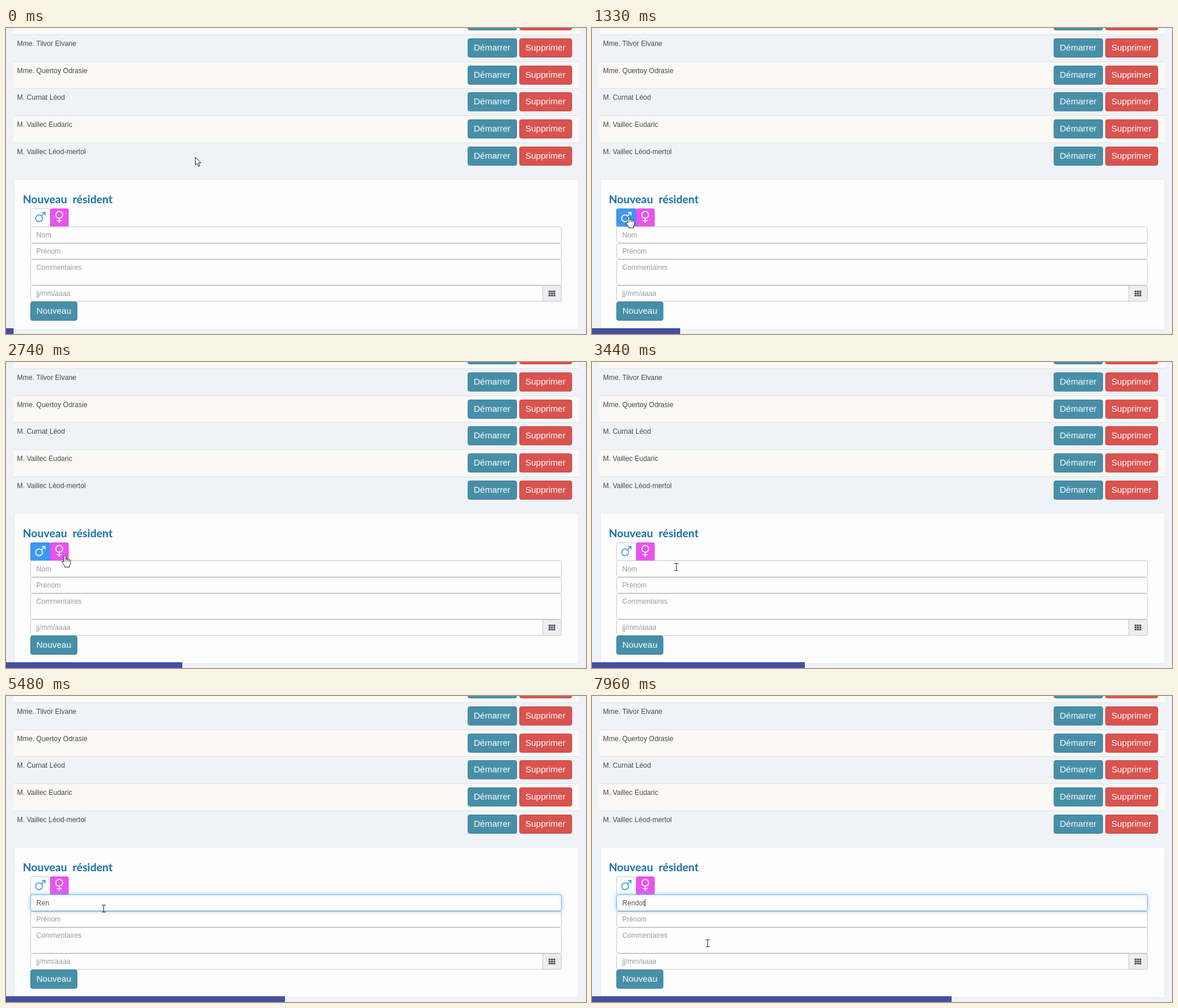
Animation, 1000 px wide and 529 px high, one loop 8000 ms. Source, as an HTML page with a canvas:

```html
<!DOCTYPE html>
<html lang="fr">
<head>
<meta charset="utf-8">
<title>Nouveau résident</title>
<style>
html, body { margin: 0; width: 100%; height: 100%; overflow: hidden; background: #eff3f7; }
canvas { display: block; width: 1000px; height: 529px; }
</style>
</head>
<body>
<canvas id="stage" width="1000" height="529"></canvas>
<script>
const ctx = document.getElementById('stage').getContext('2d');
const LOOP = 8000;
const SANS = '"Liberation Sans", Arial, sans-serif';
const TEAL = '#478fa8', RED = '#d9534f', BLUE = '#3c99f2', PINK = '#ea53f1';
const RESIDENTS = ['Mme. Tilvor Elvane', 'Mme. Quertoy Odrasie', 'M. Curnat Léod',
  'M. Vaillec Eudaric', 'M. Vaillec Léod-mertol'];
const SURNAME = 'Rendot';
const ROW = 46.65;

// Screen updates: first time, last time, steps, pointer position at the end
const UPDATES = [
  [550, 870, 5, 44, 274], [950, 1330, 6, 63, 325], [1730, 1800, 2],
  [2030, 2030, 1], [2120, 2740, 9, 101, 334], [3120, 3120, 1],
  [3200, 3510, 5, 150, 356], [3680, 3830, 3, 168, 367], [4300, 4300, 1],
  [4530, 4530, 1], [4700, 4700, 1], [5020, 5020, 1], [5480, 5480, 1],
  [6000, 6000, 1], [6400, 6400, 1], [6630, 6630, 1], [6860, 6860, 1],
  [7010, 7010, 1], [7480, 7480, 1], [7640, 7960, 5, 199, 427]
];
const KEY_TIMES = [4530, 4700, 5020, 6630, 6860, 7010];
const CARET_OFF = [[5480, 6000], [6400, 6630], [7480, 7960]];

function progressAt(t) {
  let x = 326, y = 223, steps = 1;
  for (const [from, to, count, endX = x, endY = y] of UPDATES) {
    if (t < from) break;
    const gap = count > 1 ? (to - from) / (count - 1) : 1;
    const done = Math.min(count, Math.floor((t - from) / gap + 1e-6) + 1);
    const u = done / count, eased = u * u * (3 - 2 * u);
    x += (endX - x) * eased;
    y += (endY - y) * eased;
    steps += done;
  }
  return { x, y, steps };
}

function text(str, x, y, color, font = '12px ' + SANS) {
  ctx.font = font;
  ctx.fillStyle = color;
  ctx.fillText(str, x, y);
}

function box(x, y, w, h, fill, border, radius = 3) {
  ctx.beginPath();
  ctx.roundRect(x + .5, y + .5, w - 1, h - 1, radius);
  ctx.fillStyle = fill;
  ctx.fill();
  ctx.strokeStyle = border;
  ctx.lineWidth = 1;
  ctx.stroke();
}

function button(label, x, y, w, fill, border) {
  box(x, y, w, 33, fill, border);
  text(label, x + 10.5, y + 21, '#fff', '15px ' + SANS);
}

function line(points, color, width) {
  ctx.beginPath();
  points.forEach(([x, y], i) => i ? ctx.lineTo(x, y) : ctx.moveTo(x, y));
  ctx.strokeStyle = color;
  ctx.lineWidth = width;
  ctx.stroke();
}

function ring(x, y, r, color) {
  ctx.beginPath();
  ctx.arc(x, y, r, 0, Math.PI * 2);
  ctx.strokeStyle = color;
  ctx.lineWidth = 1.7;
  ctx.stroke();
}

function drawList() {
  for (let i = -1; i < 5; i++) {
    const top = Math.round(11 + i * ROW);
    ctx.fillStyle = i % 2 ? '#faf9f6' : '#eff3f7';
    ctx.fillRect(13, top, 975, 47);
    ctx.fillStyle = '#dde1e4';
    ctx.fillRect(13, top, 975, 1);
    const y = Math.round(18.1 + i * ROW);
    button('Démarrer', 796, y, 85, TEAL, '#3b7f98');
    button('Supprimer', 885, y, 91, RED, '#d04540');
    if (i >= 0) text(RESIDENTS[i], 19, y + 13, '#484848');
  }
}

function drawToggles(maleOn, femaleOn) {
  box(42, 312, 35, 32, maleOn ? BLUE : '#fefefe', maleOn ? '#3488d9' : '#ccc', 2);
  box(76, 312, 32, 32, femaleOn ? PINK : '#fefefe', femaleOn ? '#d94be0' : '#ccc', 2);
  const male = maleOn ? '#fff' : '#3f9bdc', female = femaleOn ? '#fff' : '#ec74ee';
  ring(57, 329, 5.9, male);
  line([[61.2, 324.8], [67, 319]], male, 1.7);
  line([[62, 318.8], [67.3, 318.8], [67.3, 324]], male, 1.7);
  ring(91.8, 323, 5.9, female);
  line([[91.8, 329], [91.8, 337]], female, 1.7);
  line([[87.5, 333], [96.2, 333]], female, 1.7);
}

function drawForm(t, pointer) {
  box(14, 261, 974, 261, '#fdfdfd', '#e4e9ed');
  const title = '700 19px Lato, sans-serif';
  text('Nouveau', 29, 303, '#1a70a6', title);
  text('résident', 115, 303, '#1a70a6', title);

  const overToggles = pointer.y > 312 && pointer.y < 344;
  const overMale = overToggles && pointer.x > 42 && pointer.x < 76;
  const overFemale = overToggles && pointer.x >= 76 && pointer.x < 108;
  const maleChosen = t >= 1730 && t < 3120;
  drawToggles(maleChosen || overMale, !maleChosen || overFemale);

  const focused = t >= 4300;
  const typed = SURNAME.slice(0, KEY_TIMES.filter(k => t >= k).length);
  box(42, 372, 916, 28, '#fefefe', '#c8c8c8');
  box(42, 400, 916, 45, '#fefefe', '#c8c8c8');
  box(42, 445, 916, 28, '#fefefe', '#c8c8c8');
  if (focused) {
    ctx.shadowColor = 'rgba(102,175,233,.6)';
    ctx.shadowBlur = 7;
  }
  box(42, 343, 916, 29, '#fefefe', focused ? '#72b3e4' : '#c8c8c8');
  ctx.shadowBlur = 0;

  text(typed || 'Nom', 52.3, 361.5, typed ? '#555' : '#999');
  if (focused && !CARET_OFF.some(([a, b]) => t >= a && t < b)) {
    const end = typed ? ctx.measureText(typed).width : 0;
    ctx.fillStyle = '#444';
    ctx.fillRect(Math.round(52 + end), 351, 1, 13);
  }
  text('Prénom', 52.3, 390, '#999');
  text('Commentaires', 52.3, 418, '#999');
  text('jj/mm/aaaa', 52.3, 463, '#999');

  box(925, 445, 33, 28, '#eee', '#c8c8c8', [0, 3, 3, 0]);
  ctx.fillStyle = '#414a60';
  for (let i = 0; i < 9; i++)
    ctx.fillRect(935.5 + i % 3 * 4.1, 454 + Math.floor(i / 3) * 3.6, 3.3, 2.7);
  button('Nouveau', 42, 473, 81, TEAL, '#3b7f98');
}

const ARROW = new Path2D('M0 0V13.4L3.1 10.5L5.3 15.6L7.5 14.6L5.3 9.7H9.6Z');
const HAND = new Path2D('M-1.6 1.2Q0 -1.2 1.6 1.2V6.2Q3.3 5 4.6 6.7Q6.3 5.7 7.3 7.4' +
  'Q9.8 6.8 9.8 9.3V13.5Q9.6 16 8 17.5V20H-.3V18Q-2.4 15.5 -4.5 12' +
  'Q-5.4 9.6 -3.4 9.6L-1.6 11.4Z');

function drawPointer({ x, y }) {
  const onField = x > 42 && x < 958 && y > 344 && y < 473;
  const onToggle = x > 42 && x < 108 && y > 312 && y <= 344;
  ctx.save();
  ctx.translate(Math.round(x), Math.round(y));
  if (onField) {
    ctx.fillStyle = '#333';
    ctx.fillRect(0, -6, 1, 13);
    for (const end of [-6, 6]) {
      ctx.fillRect(-3, end, 3, 1);
      ctx.fillRect(1, end, 3, 1);
    }
  } else {
    const shape = onToggle ? HAND : ARROW;
    ctx.translate(.5, .5);
    ctx.fillStyle = '#fff';
    ctx.fill(shape);
    ctx.strokeStyle = '#222';
    ctx.lineWidth = 1;
    ctx.stroke(shape);
    if (onToggle)
      for (const [fx, fy] of [[1.6, 6.2], [4.6, 6.7], [7.3, 7.4]])
        line([[fx, fy], [fx, fy + 3.5]], '#222', .9);
  }
  ctx.restore();
}

function draw(t) {
  const pointer = progressAt(t);
  ctx.fillStyle = '#eff3f7';
  ctx.fillRect(0, 0, 1000, 529);
  drawList();
  drawForm(t, pointer);
  ctx.fillStyle = '#4550a0';
  ctx.fillRect(0, 519, Math.round(pointer.steps * 1000 / 79), 10);
  drawPointer(pointer);
}

const start = performance.now();
function tick() {
  draw((performance.now() - start) % LOOP);
  requestAnimationFrame(tick);
}
tick();
</script>
</body>
</html>
```
